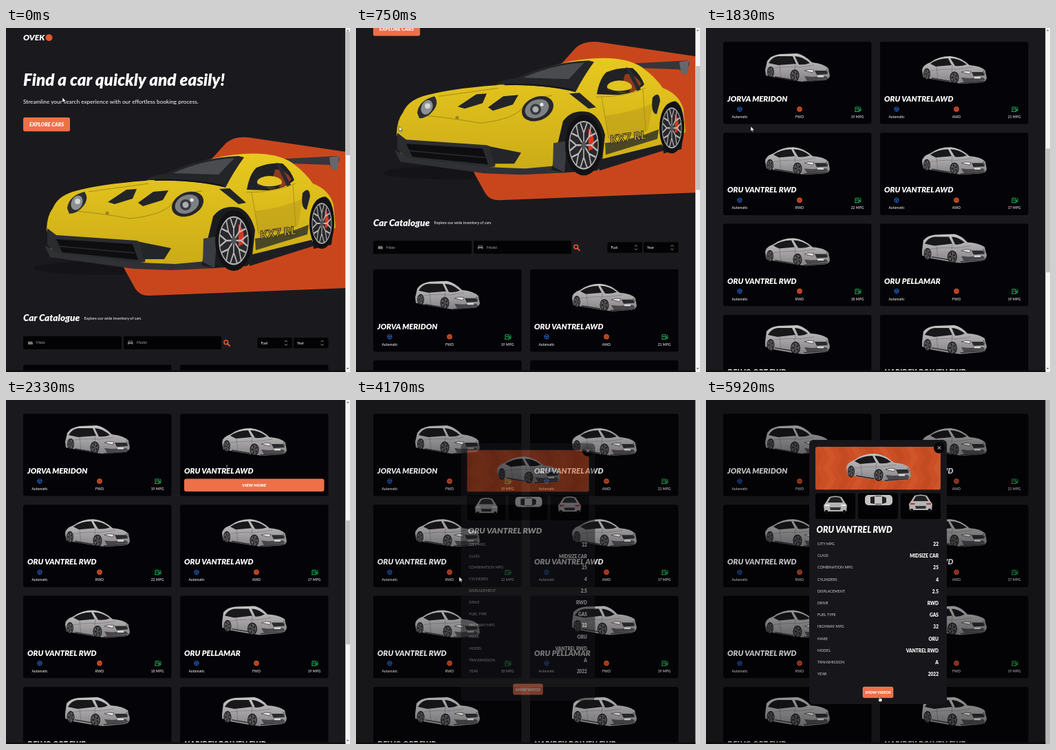
Recreate the animation shown at these times as an HTML page. Size 500 px wide and 500 px high, loop 8000 ms.

```html
<!DOCTYPE html>
<html lang="en">
<head>
<meta charset="utf-8">
<title>Car catalogue</title>
<style>
html, body { margin: 0; width: 100%; height: 100%; overflow: hidden; background: #1a1a1e; }
svg { display: block; width: 100vw; height: 100vh; }
text { font-family: Lato, "Open Sans", sans-serif; fill: #fff; }
.b { font-weight: 900; }
.i { font-weight: 900; font-style: italic; }
</style>
</head>
<body>
<svg id="stage" viewBox="0 0 500 500"></svg>
<script>
const LOOP = 8000, FPS = 12;
const ORANGE = '#ee7048';
const CARD = { x: 25, y: 489.5, w: 215.5, h: 119.6, dx: 228, dy: 132.3 };

const cards = [
  ['JORVA MERIDON', 'van', 'FWD', 19], ['ORU VANTREL AWD', 'sedan', 'AWD', 21],
  ['ORU VANTREL RWD', 'sedan', 'RWD', 22], ['ORU VANTREL AWD', 'sedan', 'AWD', 17],
  ['ORU VANTREL RWD', 'sedan', 'RWD', 18], ['ORU PELLAMAR', 'suv', 'FWD', 19],
  ['DELVO QRT FWD', 'suv', 'FWD', 22], ['NARIDEX BOLVEN FWD', 'suv', 'FWD', 25]
];
const specs = [
  ['CITY MPG', '22'], ['CLASS', 'MIDSIZE CAR'], ['COMBINATION MPG', '25'], ['CYLINDERS', '4'],
  ['DISPLACEMENT', '2.5'], ['DRIVE', 'RWD'], ['FUEL TYPE', 'GAS'], ['HIGHWAY MPG', '32'],
  ['MAKE', 'ORU'], ['MODEL', 'VANTREL RWD'], ['TRANSMISSION', 'A'], ['YEAR', '2022']
];

const range = (n, f) => Array.from({ length: n }, (_, k) => f(k)).join('');
const path = (d, fill, more = '') => `<path d="${d}" fill="${fill}" ${more}/>`;
const line = (d, stroke, w, more = '') => path(d, 'none', `stroke="${stroke}" stroke-width="${w}" ${more}`);
const rect = (x, y, w, h, fill, r = 0, more = '') =>
  `<rect x="${x}" y="${y}" width="${w}" height="${h}" rx="${r}" fill="${fill}" ${more}/>`;
const disc = (x, y, r, fill, more = '') => `<circle cx="${x}" cy="${y}" r="${r}" fill="${fill}" ${more}/>`;
const oval = (x, y, rx, ry, fill, more = '') =>
  `<ellipse cx="${x}" cy="${y}" rx="${rx}" ry="${ry}" fill="${fill}" ${more}/>`;
const text = (x, y, size, s, cls = '', more = '') =>
  `<text x="${x}" y="${y}" font-size="${size}" class="${cls}" ${more}>${s}</text>`;
const at = (x, y, body, more = '') => `<g transform="translate(${x} ${y})" ${more}>${body}</g>`;
const MID = 'text-anchor="middle"', END = 'text-anchor="end"';

// Forked spokes on a unit circle, scaled to an ellipse.
function wheel(x, y, rx, ry, spokes, caliper = '') {
  const rays = range(spokes, k => {
    const a = k * 2 * Math.PI / spokes, p = (r, t) => `${r * Math.cos(t)} ${r * Math.sin(t)}`;
    return `M${p(.12, a)}L${p(.4, a)}L${p(.76, a - .24)}M${p(.4, a)}L${p(.76, a + .24)}`;
  });
  return `<g transform="translate(${x} ${y}) scale(${rx} ${ry})">${disc(0, 0, 1, '#121214')}` +
    disc(0, 0, .78, '#29292c', 'stroke="#b4b4b7" stroke-width=".05"') + caliper +
    line(rays, '#b9b9bc', .06) + disc(0, 0, .13, '#55555a') + '</g>';
}

const shapes = {
  sedan: {
    body: 'M1 23Q1 15 13 11Q25 2 42 2Q57 3 70 15Q87 16 93 23L95 34Q94 39 88 40L60 42L44 40L14 35L3 33Z',
    glass: 'M13 13Q24 5 39 5L44 15L21 17ZM42 5Q55 5 66 14Q58 17 49 16Z',
    wheels: [[8, 28, 5, 8.5], [48, 33, 6.5, 8.8]], crease: 'M3 25Q25 20 52 21L74 18'
  },
  van: {
    body: 'M1 24L4 11Q9 3 22 1L47 0Q58 2 69 13Q87 15 93 22L95 33Q93 38 86 39L54 41L40 39L12 34L2 32Z',
    glass: 'M6 14Q11 5 20 4L41 4L46 15L20 17ZM44 4Q55 4 66 14Q58 17 50 16Z',
    wheels: [[9, 27, 5, 8], [44, 32, 6.5, 8.8]], crease: 'M4 23Q25 18 52 20L72 17'
  },
  suv: {
    body: 'M1 25L3 10Q9 3 20 2L48 1Q58 3 67 13Q84 14 92 20L95 32Q94 39 88 40L56 43L40 41L12 36L1 32Z',
    glass: 'M5 15Q10 6 19 5L40 5L45 15L19 18ZM44 5Q53 5 63 13Q56 17 49 16Z',
    wheels: [[9, 30, 5.5, 8.8], [45, 34, 7, 9.2]], crease: 'M3 25Q25 19 52 21L72 18'
  }
};

function car(kind) {
  const s = shapes[kind];
  return path(s.body, 'url(#silver)') + path(s.glass, '#18181b') +
    line(s.crease, '#7a787b', .7) + line('M22 17L24 36M45 15L44 25', '#67656a', .6) +
    path('M58 25Q64 22 72 24L70 28Z M90 23L93 25L92 28Z', '#e4e4e5', 'stroke="#333" stroke-width=".7"') +
    path('M73 25L90 25L92 30L76 31Z', '#2b2b2f') + path('M58 33L68 34L90 33L93 37L62 40Z', '#49474b') +
    rect(77, 32, 9, 2.4, '#ddd') + line('M15 34L42 38.5M57 41L91 38.5', '#29292c', 1.4) +
    s.wheels.map(w => wheel(...w, 5)).join('');
}

function sportsCar() {
  const dark = '#232427', yellow = 'url(#yellow)', crease = '#a08615';
  const caliper = path('M.25 -.55Q.6 -.4 .55 .1L.25 .2Z', '#d43920');
  return oval(140, 349, 100, 10, '#0f0f12', 'opacity=".5"') +
    path('M352 159Q332 157 320 167L180 322Q165 338 173 352L188 379Q194 389 208 389L494 378V180Z', '#c9461d') +
    path('M404 194L421 216L427 212L415 192Z', '#2b2c30') +
    path('M387 191L482 186Q486 187 484 193L478 207L470 199L389 196Z', '#35363a') +
    path('M470 188L484 186L482 205Q478 208 472 203Z', '#66676b') +
    path('M59 292Q60 272 68 262Q75 245 97 238Q135 227 203 222L228 217Q290 186 345 183Q392 180 416 196Q436 211 446 226' +
      'Q470 235 476 257L479 290L446 316L350 345L245 346L66 326Z', yellow) +
    path('M203 221Q212 213 232 212Q278 189 338 186L346 188Q330 210 319 232Q280 221 203 221Z', '#242528') +
    path('M243 211Q285 192 332 189L309 213Z', '#4a4b4f') + line('M216 221Q264 219 316 229', '#131316', 2) +
    path('M350 235Q354 212 364 203Q384 195 402 197Q414 207 419 221Q405 234 380 236Z', '#202124') +
    path('M384 233L391 206Q404 203 415 220L404 231Z', '#8e3a20') +
    path('M392 196L398 197L414 228L409 231Z', '#2a2a2c') +
    path('M362 266Q400 262 432 248L424 288L367 302Z', '#b3961a', 'opacity=".45"') +
    line('M349 239Q390 239 421 226M357 239L367 298Q390 300 421 288L417 228', crease, .8) +
    oval(383, 224, 18, 9, '#e2c31f') + path('M365 226Q380 234 400 227L396 232L372 233Z', dark) +
    line('M120 238Q165 232 207 226M102 266Q150 271 180 277Q226 272 240 257Q250 240 285 237', crease, .9) +
    path('M148 253L175 235L190 234L184 248L158 256Z', dark) + path('M192 254L214 238L236 236L228 250L199 259Z', dark) +
    path('M310 234L325 233L349 254L338 256Z', dark) +
    path('M89 262Q91 244 114 238Q121 247 113 258Q104 270 92 270Z', '#2b2c2f') +
    oval(103, 254, 8, 11, '#8d9092', 'transform="rotate(25 103 254)"') + disc(104, 252, 4, '#d4d6d6') +
    oval(264, 256, 24, 17, '#26272b', 'transform="rotate(-23 264 256)"') +
    oval(263, 256, 18, 13, '#7d8184', 'transform="rotate(-23 263 256)"') +
    disc(261, 257, 8, '#36393e') + disc(261, 257, 4.5, '#a9adb0') + disc(270, 250, 2.5, '#eee') +
    path('M60 291L73 301L190 309L205 315L202 340L190 342L73 328L60 315Z', '#2b2c30') +
    path('M73 307L184 314L192 337L82 326Z', '#0e0e11') + line('M75 317L187 327', '#2a2b2f', 1.5) +
    path('M195 311L240 320L230 336L200 336Z', '#242529') +
    path('M56 316L78 328L194 341L246 343L302 338L306 349L240 352L186 350L64 333Z', '#303135') +
    path('M284 345L301 274Q314 256 338 261Q355 267 362 294L357 340L350 346L302 349Z', '#1b1c1f') +
    path('M287 306L307 303L303 349L286 340Z', '#3b3c41') +
    path('M350 331L444 308L450 316L354 346Z', '#1d1e22') +
    path('M362 306Q402 302 440 286L438 300L363 323Z', '#4b4726') +
    text(370, 307, 16.5, 'KX7 RL', 'i', 'transform="rotate(-8 370 307)" style="fill:#bda427" stroke="#2b2b22" stroke-width=".9"') +
    path('M431 240Q441 229 442 245L437 264Q428 263 431 240Z', dark) +
    path('M443 278Q446 246 464 245Q476 250 477 282L473 315L447 321Z', '#17181b') +
    wheel(331, 309, 27, 44, 8, caliper) + wheel(459, 284, 18, 37, 8, caliper) +
    disc(147, 269, 2.5, '#9b821a');
}

function icons(drive, mpg) {
  const label = (x, s) => text(x, 111, 5.1, s, '', MID);
  return disc(24, 98, 3.2, 'none', 'stroke="#2467cf" stroke-width="1"') +
    line('M21 97.5H27M24 98V101', '#2467cf', 1.1) +
    disc(111, 98, 3.8, '#dc532a') + disc(111, 98, 2, 'none', 'stroke="#762812" stroke-width=".7"') +
    disc(111, 98, .7, '#762812') +
    line('M192 101.5V95H197V101.5M191 101.5H198M193 97.7H196M197 98H198.5V100.5H200V96L198.5 94.5', '#1fae57', 1) +
    label(24, 'Automatic') + label(111, drive) + label(195, mpg + ' MPG');
}

function card([title, kind, drive, mpg], k) {
  const top = { sedan: 19, van: 17, suv: 14 }[kind];
  return at(CARD.x + CARD.dx * (k % 2), CARD.y + CARD.dy * (k >> 1),
    rect(0, 0, CARD.w, CARD.h, '#040408', 3) + at(60, top, car(kind)) + text(6, 87, 11.3, title, 'i') +
    `<g id="info${k}">${icons(drive, mpg)}</g><g id="more${k}">${rect(6, 94.5, 203.5, 18.5, ORANGE, 3)}` +
    text(107.7, 106, 6.4, 'VIEW MORE', 'i', MID) + '</g>');
}

function filters() {
  const gray = 'style="fill:#a0a0a5"';
  const select = (x, s) => rect(x, 450, 50.5, 15.5, '#030305', 2) + text(x + 5, 459.6, 5.3, s) +
    line(`M${x + 39.5} 456.3l2 -2l2 2M${x + 39.5} 459.3l2 2l2 -2`, '#bbb', .8);
  return rect(25, 448, 143, 19, '#030305', 2) + rect(171, 448, 142, 19, '#030305', 2) +
    path('M32 460V455L34 456.5V455L36 456.5V455L39 457V460Z', '#77777c') +
    path('M177 460V457L178.5 454.5H183L184.5 457V460H183V459H178.5V460Z', '#77777c') + rect(178.8, 455.3, 3.9, 1.4, '#030305') +
    text(44, 459.4, 5.3, 'Make', '', gray) + text(190, 459.4, 5.3, 'Model', '', gray) +
    disc(319.8, 456.8, 2.9, 'none', `stroke="#e55f35" stroke-width="1.5"`) +
    line('M322 459L325 462', '#e55f35', 1.8, 'stroke-linecap="round"') + select(365.5, 'Fuel') + select(418, 'Year');
}

function page() {
  return text(25, 18.3, 12, 'OVEK', 'i') + disc(62.5, 14, 5, '#e0582f') +
    text(25, 83.5, 24.1, 'Find a car quickly and easily!', 'i') +
    text(25, 110, 8.28, 'Streamline your search experience with our effortless booking process.') +
    rect(25, 130, 68, 20.3, ORANGE, 2.5) + text(59, 142.7, 7.4, 'EXPLORE CARS', 'i', MID) + sportsCar() +
    text(25, 426.4, 13.6, 'Car Catalogue', 'i') + text(113.5, 424, 5.55, 'Explore our wide inventory of cars') +
    filters() + cards.map(card).join('');
}

function endView(light) {
  return path('M0 14L3 10L8 2Q17 -1 26 2L31 10L34 14L33 23H1Z', '#b5b3b4') + path('M6 10L10 3Q17 1 24 3L28 10Z', '#222') +
    path('M2 13H9L8 15H2ZM25 13H32V15H26Z', light) + path('M9 17H25L24 21H10Z', '#333') +
    rect(2, 21, 4, 5, '#111', 1) + rect(28, 21, 4, 5, '#111', 1);
}

function modal() {
  const chevrons = range(11, k => path(`M${150 + k * 20} 68h10l9 15.6l-9 15.6h-10l9 -15.6zM${150 + k * 20} 99.2h10l9 15.6l-9 15.6h-10l9 -15.6z`,
    k % 2 ? '#e06a3b' : '#a8401c', 'opacity=".25"'));
  return rect(150, 58, 200, 384, '#17171b', 6) +
    `<g clip-path="url(#banner)">${rect(159, 68, 182, 62.6, '#cb4e24')}${chevrons}</g>` + at(203, 76, car('sedan')) +
    range(3, k => rect(159 + 62 * k, 135.5, 58, 37.5, '#030305', 3)) +
    at(171, 139, endView('#f4f4f4')) + at(295, 137, endView('#b3342d')) +
    rect(231, 138, 40, 15, '#c4c2c2', 5) + path('M239 141L245 140V151L239 150ZM256 140L262 142V149L256 151Z', '#222') +
    line('M246 139.7H255M246 151.3H255', '#333', 1) +
    disc(339, 69.5, 8, '#050507') + line('M336.8 67.3l4.4 4.4m0 -4.4l-4.4 4.4', '#fff', .9) +
    text(160.5, 193, 12.4, 'ORU VANTREL RWD', 'i') +
    specs.map(([k, v], n) => text(162, 211 + n * 17.2, 5.35, k, '', 'style="fill:#d2d2d5"') +
      text(338, 212 + n * 17.2, 6.6, v, 'b', END)).join('') +
    rect(228, 417, 44, 15.7, ORANGE, 2, 'stroke="#f7b59d" stroke-width=".4"') + text(250, 427, 5.7, 'SHOW VIDEOS', 'i', MID);
}

const gradient = (id, a, b) => `<linearGradient id="${id}" x2="0" y2="1"><stop stop-color="${a}"/><stop offset="1" stop-color="${b}"/></linearGradient>`;
const edge = 'stroke="#111" stroke-width=".5"';

document.getElementById('stage').innerHTML = `<defs>${gradient('silver', '#c8c6c6', '#848285')}${gradient('yellow', '#e8c91f', '#cbab17')}` +
  `<clipPath id="banner">${rect(159, 68, 182, 62.6, '#000', 3)}</clipPath></defs>` +
  rect(0, 0, 500, 500, '#1a1a1e') + `<g id="page">${page()}</g>` +
  rect(493.3, 0, 6.7, 500, '#f5f5f5') +
  `<g id="bar">${rect(493.3, 0, 6.7, 180, '#c2c2c2', 0, 'id="thumb"')}${path('M495 4.3l1.7 -2l1.7 2zM495 494l1.7 2l1.7 -2z', '#555')}</g>` +
  rect(0, 497.5, 493.3, 2.5, '#100d0c') + rect(0, 0, 500, 500, '#000', 0, 'id="shade"') +
  `<g id="modal">${modal()}</g><g id="cursor">` +
  `<g id="arrow">${path('M0 0V7.2L1.7 5.6L2.8 8.2L3.9 7.7L2.8 5.2H5.2Z', '#fff', edge)}</g>` +
  `<g id="beam">${line('M-1.4 -3.2Q0 -3.2 0 -2.2Q0 -3.2 1.4 -3.2M0 -2.2V3M-1.4 3.6Q0 3.6 0 3Q0 3.6 1.4 3.6', '#bbb', .7)}</g>` +
  `<g id="hand">${path('M-.8 0Q0 -.9 .7 0V2.8L3 3.2Q3.7 3.5 3.5 4.7L2.8 7.5H-.7L-2.5 4.6Q-2.4 3.7 -.8 4.6Z', '#fff', edge)}</g></g>`;

const el = id => document.getElementById(id);
const show = (id, on) => el(id).setAttribute('display', on ? 'inline' : 'none');
const smooth = u => u * u * (3 - 2 * u);

// Keys are [step, values...]; steps are twelfths of a second.
const scrollKeys = [[6, 0], [7, 20], [8, 70], [9, 138.7], [13, 429.5], [14, 447], [15, 457], [18, 469.5]];
const mouseKeys = [[0, 82, 101], [4, 62, 143], [22, 65, 143], [28, 321, 98], [29, 321, 98], [38, 134.5, 239], [43, 134.5, 239],
  [47, 150, 257], [58, 150, 257], [62, 162, 292], [64, 162, 292], [71, 252.5, 431]];

function sample(keys, n, ease = u => u) {
  const k = keys.findIndex(key => key[0] > n);
  if (k === 0) return keys[0].slice(1);
  if (k < 0) return keys[keys.length - 1].slice(1);
  const a = keys[k - 1], b = keys[k], u = ease((n - a[0]) / (b[0] - a[0]));
  return a.slice(1).map((v, j) => v + (b[j + 1] - v) * u);
}

function draw(ms) {
  const n = Math.floor((ms + 5) * FPS / 1000);
  const [scroll] = sample(scrollKeys, n);
  const [mx, my] = sample(mouseKeys, n, smooth);
  const open = Math.min(1, Math.max(0, (n - 48) / 4));
  let pointer = open && my > 417 ? 'hand' : 'arrow';

  cards.forEach((_, k) => {
    const x = mx - CARD.x - CARD.dx * (k % 2);
    const y = my + scroll - CARD.y - CARD.dy * (k >> 1);
    const inside = !open && x >= 0 && x <= CARD.w && y >= 0 && y <= CARD.h;
    const hover = inside && n > 22;
    show('info' + k, !hover);
    show('more' + k, hover);
    if (inside && x > 6 && x < 105 && y > 76 && y < 91) pointer = 'beam';
    if (hover && x > 6 && x < 209 && y > 94 && y < 113) pointer = 'hand';
  });

  el('page').setAttribute('transform', `translate(0 ${-scroll})`);
  el('thumb').setAttribute('y', 5 + scroll * .3625);
  show('bar', !open);
  el('shade').setAttribute('opacity', .25 * open);
  show('modal', open > 0);
  el('modal').setAttribute('opacity', open);
  el('modal').setAttribute('transform', `translate(250 250) scale(${.95 + .05 * open}) translate(-250 -250)`);
  el('cursor').setAttribute('transform', `translate(${mx} ${my})`);
  ['arrow', 'beam', 'hand'].forEach(id => show(id, id === pointer));
}

const start = performance.now();
function tick() {
  draw((performance.now() - start) % LOOP);
  requestAnimationFrame(tick);
}
tick();
</script>
</body>
</html>
```
